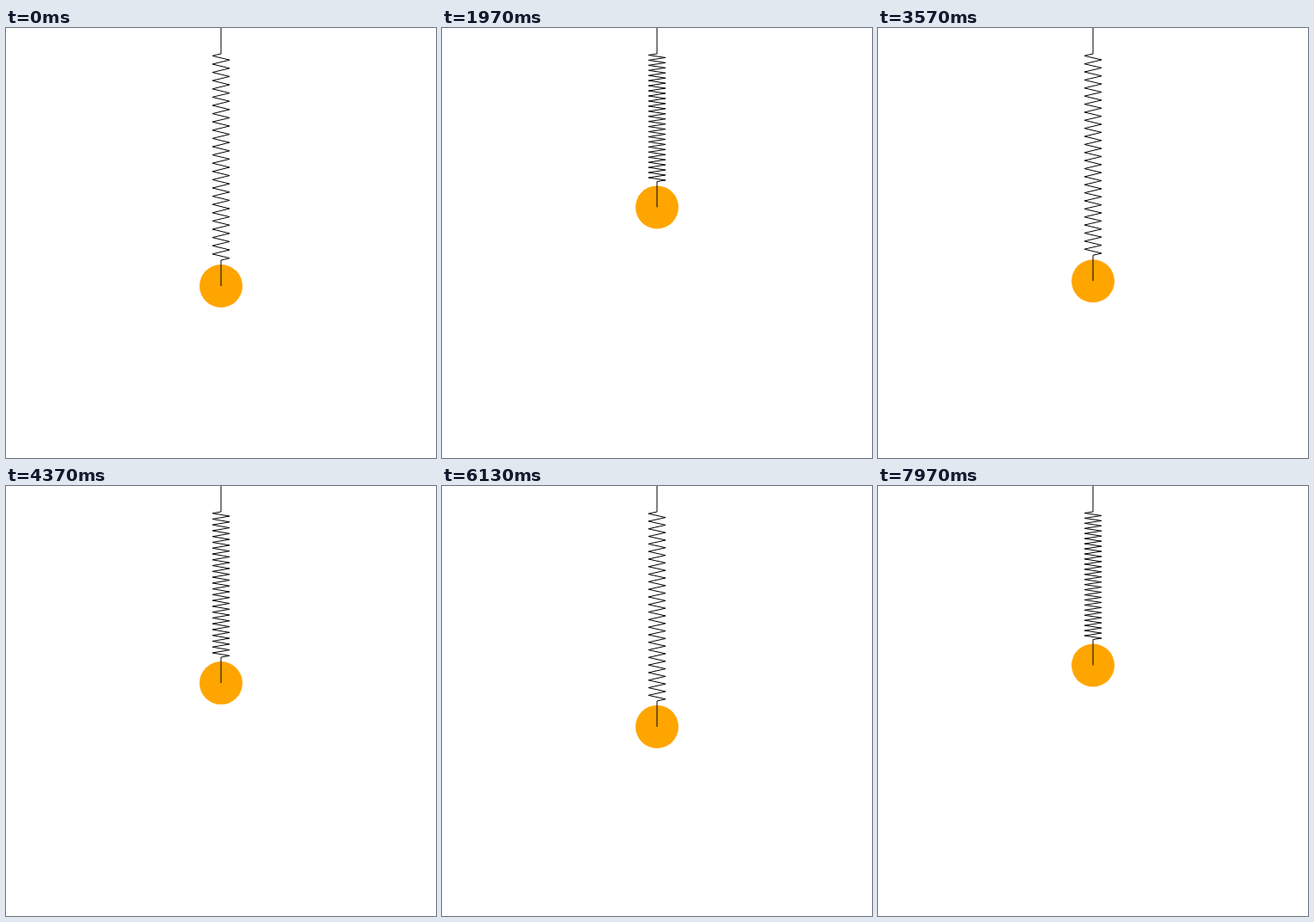
Write an HTML page with a canvas that moves like this. It is 500 px wide and 500 px high and loops after 8000 ms.

```html
<!DOCTYPE html>
<html lang="en">
<head>
<meta charset="utf-8">
<title>Mass on a spring</title>
<style>
  html, body { margin: 0; width: 100%; height: 100%; overflow: hidden; background: #fff; }
  canvas { display: block; width: 500px; height: 500px; }
</style>
</head>
<body>
<canvas id="stage" width="500" height="500"></canvas>
<script>
const ctx = document.getElementById("stage").getContext("2d");
const SIZE = 500, LOOP = 8000;
const X = 250, REST = 250, SWING = 50, RADIUS = 25;
const STEM = 30, HALF_COILS = 50, COIL_WIDTH = 10;
const OMEGA = 0.06325; // radians per step

// Thirty steps a second, each starting on a multiple of 10 ms.
function stepAt(ms) {
  return Math.floor(Math.floor(ms / 10) * 0.3 + 0.15);
}

function drawBall(y) {
  ctx.fillStyle = "#ffa500";
  ctx.beginPath();
  ctx.arc(X, y, RADIUS, 0, Math.PI * 2);
  ctx.fill();
}

function drawSpring(y) {
  const pitch = (y - 2 * STEM) / HALF_COILS;
  ctx.strokeStyle = "#000";
  ctx.lineWidth = 1;
  ctx.lineJoin = "round";
  ctx.beginPath();
  ctx.moveTo(X, 0);
  ctx.lineTo(X, STEM);
  for (let i = 0; i < HALF_COILS; i++) {
    const side = i % 2 ? 1 : -1;
    ctx.lineTo(X + side * COIL_WIDTH, STEM + (i + 0.5) * pitch);
  }
  ctx.lineTo(X, y - STEM);
  ctx.lineTo(X, y);
  ctx.stroke();
}

function draw(ms) {
  const y = REST + SWING * Math.cos(OMEGA * stepAt(ms));
  ctx.fillStyle = "#fff";
  ctx.fillRect(0, 0, SIZE, SIZE);
  drawBall(y);
  drawSpring(y);
}

const start = performance.now();
function tick() {
  draw((performance.now() - start) % LOOP);
  requestAnimationFrame(tick);
}
tick();
</script>
</body>
</html>
```
